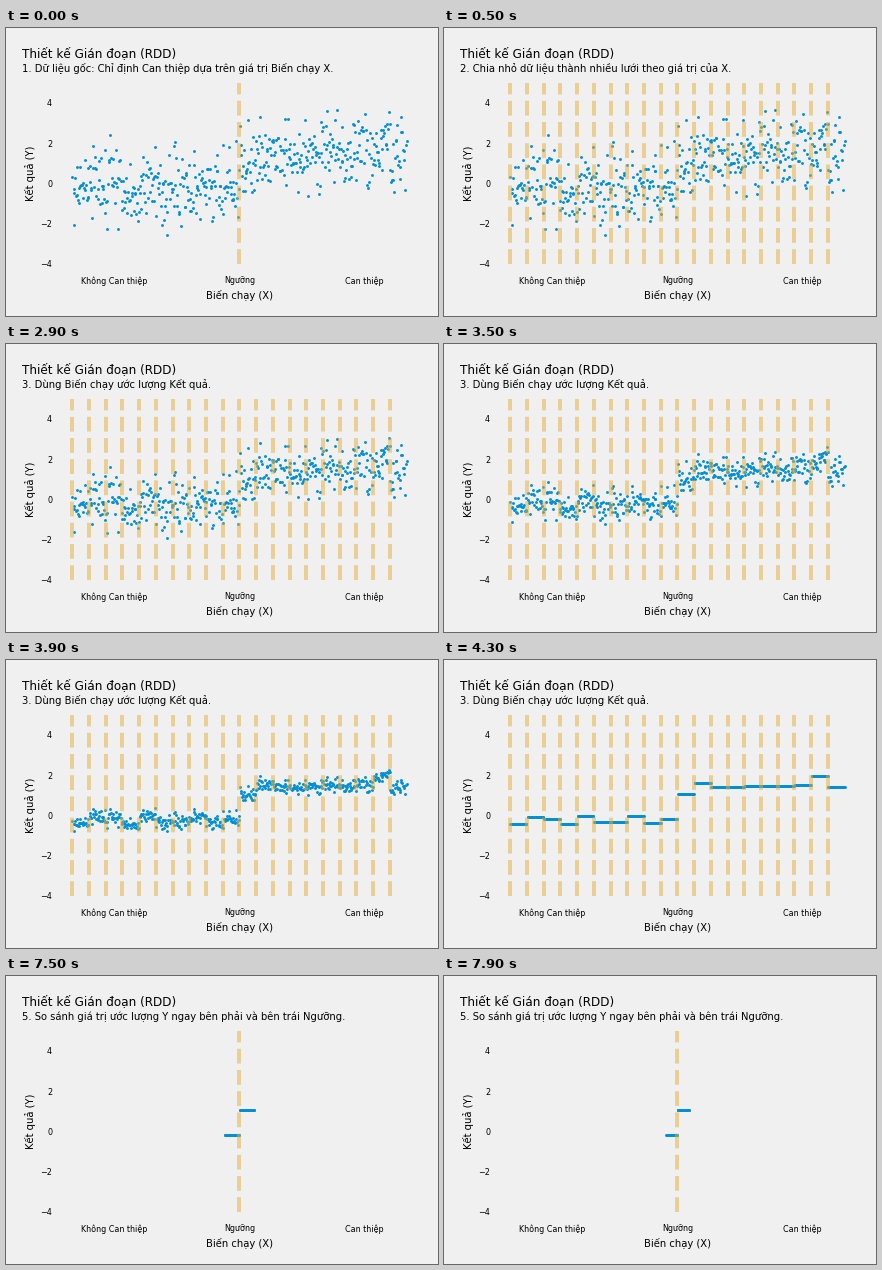
These frames come from a looping animation (432 px wide and 288 px high, 8 s). A matplotlib script:

```python
import numpy as np
import matplotlib.pyplot as plt
from matplotlib.animation import FuncAnimation

W, H, DPI = 432, 288, 72
INTERVAL, LOOP = 100, 8000
BACK, BLUE, SAND = "#f0f0f0", "#008fd5", "#e5ae38"
BINS, CUT, COUNT = 20, 0.5, 500
SPLIT, COLLAPSE, FOCUS, COMPARE = 500, 2500, 5500, 7500

CAPTIONS = [
    (0, "1. Dữ liệu gốc: Chỉ định Can thiệp dựa trên giá trị Biến chạy X."),
    (SPLIT, "2. Chia nhỏ dữ liệu thành nhiều lưới theo giá trị của X."),
    (COLLAPSE, "3. Dùng Biến chạy ước lượng Kết quả."),
    (FOCUS, "4. Tập trung vào giá trị ước lượng gần Ngưỡng."),
    (COMPARE, "5. So sánh giá trị ước lượng Y ngay bên phải và bên trái Ngưỡng."),
]


def bin_mean(i):
    """A low rippling level before the cutoff, a higher one after it."""
    before = -.22 - .22 * np.cos(2.28 * i)
    after = np.interp(i, [10, 11, 12, 17, 18, 19],
                      [1.06, 1.6, 1.41, 1.5, 1.95, 1.41])
    return np.where(i < BINS // 2, before, after)


def progress(ms, start):
    """Linear tween in ten 200 ms steps, the first one taken at once."""
    return np.clip((ms - start) // 200 + 1, 0, 10) / 10


rng = np.random.default_rng(12)
X = (np.arange(COUNT) + rng.random(COUNT)) / COUNT
GROUP = (X * BINS).astype(int)
MEAN = bin_mean(GROUP)
NOISE = rng.normal(0, 0.9, COUNT)
NEAR_CUT = np.abs(X - CUT) < 1 / BINS

fig = plt.figure(figsize=(W / DPI, H / DPI), dpi=DPI, facecolor=BACK)
ax = fig.add_axes([49.6 / W, 43.15 / H, 367.7 / W, 199 / H], facecolor=BACK)
ax.set(xlim=(-.05, 1.05), ylim=(-4.45, 5.45))
ax.spines[:].set_visible(False)
ax.tick_params(length=0, pad=3.5, labelsize=8)
ax.set_xticks([.125, CUT, .875], ["Không Can thiệp", "Ngưỡng", "Can thiệp"])
ax.set_yticks(range(-4, 5, 2))
ax.set_xlabel("Biến chạy (X)", fontsize=10)
ax.set_ylabel("Kết quả (Y)", fontsize=10)

fig.text(16 / W, 1 - 29 / H, "Thiết kế Gián đoạn (RDD)", fontsize=12)
caption = fig.text(16 / W, 1 - 44 / H, "", fontsize=10)

dots, = ax.plot([], [], "o", color=BLUE, ms=2.9, mew=0, zorder=1)
grid = [ax.plot([i / BINS] * 2, [-4, 5], "--", color=SAND, lw=4, alpha=.5,
                zorder=2)[0] for i in range(BINS)]


def update(frame):
    ms = frame * INTERVAL
    caption.set_text([text for start, text in CAPTIONS if ms >= start][-1])

    x = CUT + (X - CUT) * (1 - progress(ms, COMPARE))
    y = MEAN + NOISE * (1 - progress(ms, COLLAPSE))
    shown = NEAR_CUT | (ms < FOCUS)
    dots.set_data(x[shown], y[shown])

    for i, line in enumerate(grid):
        line.set_visible(i == BINS // 2 or SPLIT <= ms < COMPARE)
    return [caption, dots, *grid]


anim = FuncAnimation(fig, update, frames=LOOP // INTERVAL, interval=INTERVAL,
                     repeat=True, repeat_delay=0)
plt.show()
```
